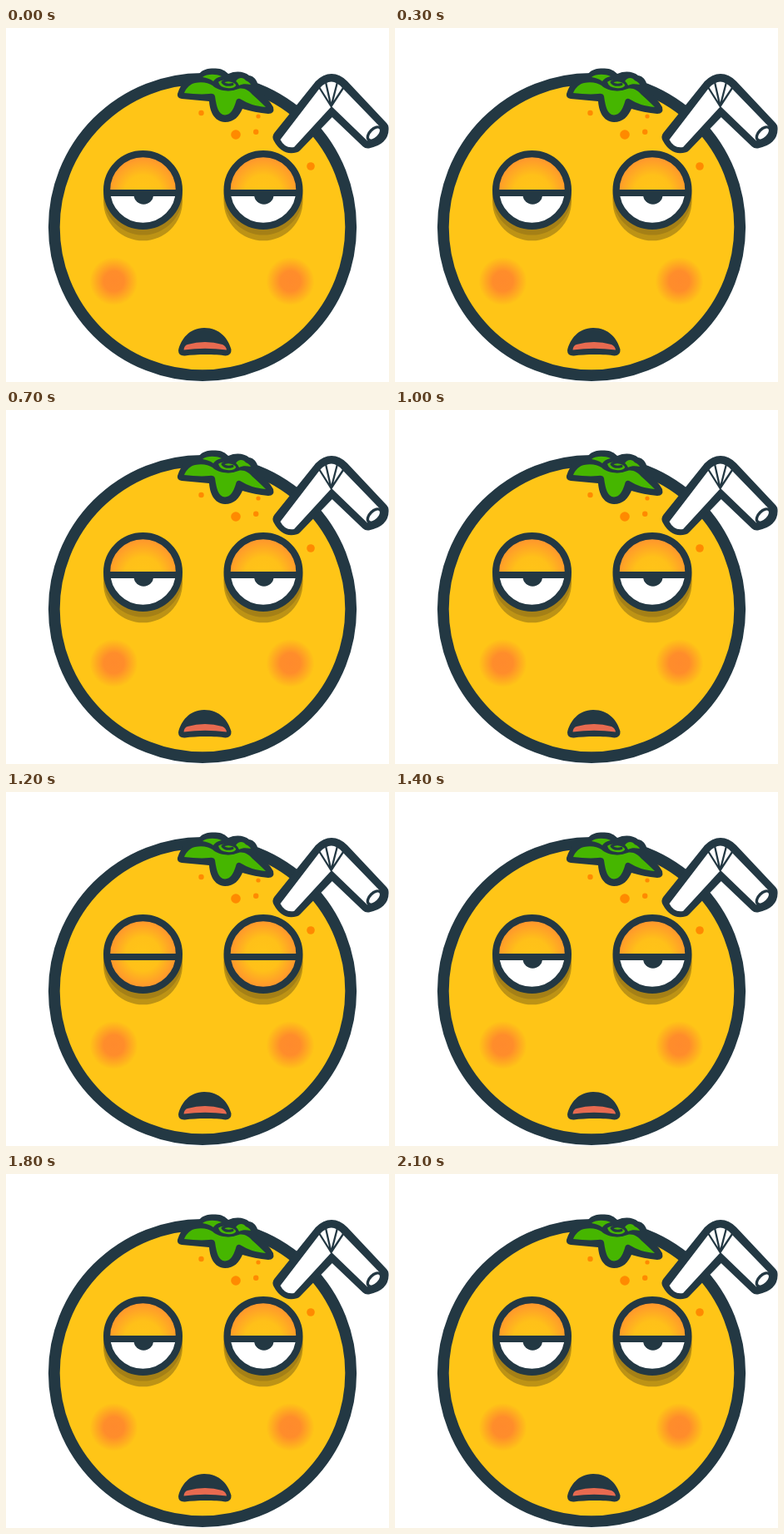
Animation of 460 by 425 pixels, one loop 2300 ms. Source, as an HTML page with a canvas:

```html
<!DOCTYPE html>
<html lang="en">
<head>
<meta charset="utf-8">
<title>Sleepy orange</title>
<style>
  html, body { margin: 0; width: 100%; height: 100%; overflow: hidden; background: #fff; }
  canvas { display: block; width: 460px; height: 425px; }
</style>
</head>
<body>
<canvas id="stage"></canvas>
<script>
const W = 460, H = 425, LOOP = 2300;
const INK = '#233843', PEEL = '#ffc517', GREEN = '#46b600', SPOT = '#ff8a00';
const BLINKS = [[500, 700], [1200, 1400], [1600, 1800]];

const canvas = document.getElementById('stage');
const ctx = canvas.getContext('2d');
const ratio = window.devicePixelRatio || 1;
canvas.width = W * ratio;
canvas.height = H * ratio;
ctx.scale(ratio, ratio);
ctx.lineJoin = ctx.lineCap = 'round';

function paint(path, fill, stroke, width) {
  if (fill) { ctx.fillStyle = fill; ctx.fill(path); }
  if (stroke) { ctx.strokeStyle = stroke; ctx.lineWidth = width; ctx.stroke(path); }
}

function shape(d, fill, stroke, width) {
  paint(new Path2D(d), fill, stroke, width);
}

function oval(x, y, rx, ry, turn, fill, stroke, width) {
  const path = new Path2D();
  path.ellipse(x, y, rx, ry, turn, 0, Math.PI * 2);
  paint(path, fill, stroke, width);
}

function disc(x, y, r, fill, stroke, width) {
  oval(x, y, r, r, 0, fill, stroke, width);
}

function glow(x, y, r, stops) {
  const g = ctx.createRadialGradient(x, y, 0, x, y, r);
  stops.forEach(([at, color]) => g.addColorStop(at, color));
  return g;
}

function drawBody() {
  disc(236, 239, 178.2, PEEL, INK, 13.8);
  [[234.5, 102, 3.2], [276, 128, 5.8], [300.2, 124.8, 3.2], [303, 106, 2.6], [366, 166, 4.8]]
    .forEach(([x, y, r]) => disc(x, y, r, SPOT));
  for (const x of [129.5, 341.5]) {
    disc(x, 304, 29, glow(x, 304, 29, [
      [0, '#ff8a2d'], [0.42, '#ff8d2b'], [1, 'rgba(255,141,43,0)']
    ]));
  }
}

function drawLeaves() {
  shape('M206 79 C208 72 212 66 215 62 C221 58 226 58 231 57 C234 50 242 48.5 250 48.5 ' +
    'C258 48 263 51 267 55 C276 51 286 52 292 57 C298 58 301 62 303 69 C300 72 300 74 304 76 ' +
    'C311 81 317 88 321 95 Q323 103 315 103 C304 102 294 100 284 97 ' +
    'C280 106 274 113 263 113 C250 112 245 101 244 88 C233 87 222 86 211 85 Q205 84 206 79Z', INK);
  shape('M214 78 C217 71 222 67 227 66 C236 64 243 66 248 69 C254 75 266 77 276 74 ' +
    'C284 70 291 74 296 80 C302 85 308 91 312 95 C300 94 291 91 281 85 Q277 84 276 89 ' +
    'C273 98 270 104 263 104.5 C255 104 253 95 251 82 Q250 78 244 79 C234 80 224 79 214 78Z', GREEN);
  shape('M236 59 C241 55 252 55 259 58 C254 59 251 61 249 64 C245 61 241 60 236 59Z', GREEN);
  shape('M276 64 C279 59 285 59 288 63 C291 64 293 66 294 68 C288 67 284 67 280 69Z', GREEN);
  oval(266, 68, 12, 5.5, 0.1, GREEN);
  shape('M254 66 C256 74 274 77 278 69 C276 63 266 61 260 65 Q264 70 272 67.5', null, INK, 3);
}

function drawStraw() {
  shape('M329 131 L378 70 Q391 57 404 70 L451 120 Q452 133 434.5 136 L391.5 95 L347 141 Q336 144 329 131Z',
    INK, INK, 17);
  shape('M329.5 134 L377 72 Q391 57 404 72 L450 119.5 L434 135.5 L391 94 L346 143 Q335 145 329.5 134Z', '#fff');
  shape('M390.5 94 L376 71 M390.5 94 L384 65 M390.5 94 L398 65 M390.5 94 L405 72', null, INK, 2.3);
  oval(442.5, 127, 10, 5.7, -Math.PI / 4, '#fff', INK, 3.4);
}

function drawMouth() {
  shape('M207 387 C210 374 220 360 238 360 C257 360 267 373 270.5 386 ' +
    'Q271 393 264 393.5 C252 391.5 228 391.5 215 393.5 Q207 394 207 387Z', INK);
  shape('M213.5 386.5 Q214 381 218 380 Q239 374 260 380 Q264.5 382 265 386.5 Q239 383 213.5 386.5Z', '#e76a50');
}

function drawEye(x, closed) {
  const y = 194.5, r = 43.4, lidY = 198;
  disc(x, y + 13.3, 47.5, '#bd9315');
  disc(x, y + 6.5, 47.5, '#a58016');
  disc(x, y, r, '#fff');
  ctx.save();
  ctx.beginPath();
  ctx.arc(x, y, r, 0, Math.PI * 2);
  ctx.clip();
  if (!closed) disc(x + 0.8, 200, 11.8, INK);
  ctx.fillStyle = glow(x, closed ? y : 199, closed ? 41 : 45, [
    [0, PEEL], [0.5, '#ffc019'], [0.9, '#ff9c2a'], [1, '#ff962d']
  ]);
  ctx.fillRect(x - r, y - r, r * 2, closed ? r * 2 : lidY - y + r);
  ctx.fillStyle = INK;
  ctx.fillRect(x - r, lidY - 4, r * 2, 8);
  ctx.restore();
  disc(x, y, r, null, INK, 8.2);
}

function draw(t) {
  const closed = BLINKS.some(([from, to]) => t >= from && t < to);
  ctx.fillStyle = '#fff';
  ctx.fillRect(0, 0, W, H);
  drawBody();
  drawLeaves();
  drawStraw();
  drawEye(164.5, closed);
  drawEye(309, closed);
  drawMouth();
}

const start = performance.now();
function tick() {
  draw((performance.now() - start) % LOOP);
  requestAnimationFrame(tick);
}
tick();
</script>
</body>
</html>
```
